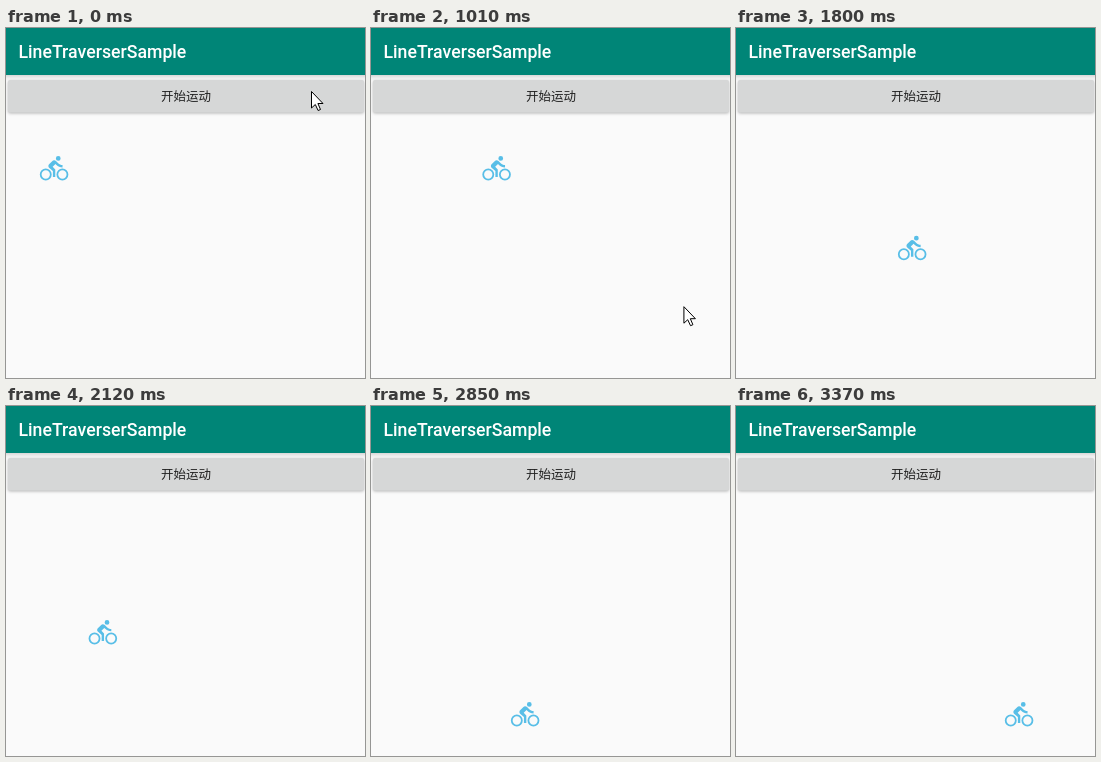
These frames come from a looping animation (359 px wide and 350 px high, 3.73 s). An HTML page with a canvas:

```html
<!DOCTYPE html>
<html lang="zh">
<head>
<meta charset="utf-8">
<style>
  html, body { margin: 0; width: 100%; height: 100%; overflow: hidden; background: #fafafa; }
  canvas { display: block; }
</style>
</head>
<body>
<canvas id="stage" width="359" height="350"></canvas>
<script>
const ctx = document.getElementById('stage').getContext('2d');
const LOOP = 3730;

// The screen refreshes in steps: [start time, equal steps until the next start].
const STEPS = [[650, 10], [1160, 1], [1220, 3], [1360, 1], [1420, 6], [1740, 2], [1860, 9],
  [2290, 1], [2350, 2], [2440, 1], [2500, 7], [2850, 1], [2900, 9], [3370, 1]];

const clamp = v => Math.min(1, Math.max(0, v));
const progress = (t, from, to) => clamp((t - from) / (to - from));
const ease = u => u * u * (3 - 2 * u);

function circle(path, x, y, r) {
  path.moveTo(x + r, y);
  path.arc(x, y, r, 0, Math.PI * 2);
}

const rider = new Path2D('M10.8 10.5l2.4-2.4.8.8c1.3 1.3 3 2.1 5.1 2.1V9c-1.5 0-2.7-.6-3.6-1.5' +
  'l-1.9-1.9c-.5-.4-1-.6-1.6-.6s-1.1.2-1.4.6L7.8 8.4c-.4.4-.6.9-.6 1.4 0 .6.2 1.1.6 1.4' +
  'L11 14v5h2v-6.2z');
circle(rider, 15.5, 3.5, 2);
const wheels = new Path2D();
circle(wheels, 5, 17, 4.25);
circle(wheels, 19, 17, 4.25);
const arrow = new Path2D('M0 0V16.5L3.8 13 6.6 19 9 18 6.4 12H11.5Z');
const button = new Path2D();
button.roundRect(2, 52, 356, 32.5, 2);

function snap(t) {
  if (t < STEPS[0][0]) return 0;
  let i = STEPS.length - 1;
  while (t < STEPS[i][0]) i--;
  const [start, count] = STEPS[i];
  if (i === STEPS.length - 1) return start;
  const step = (STEPS[i + 1][0] - start) / count;
  return start + Math.floor((t - start) / step + 1e-6) * step;
}

// Line to the right, S-curve down to the left, line to the right.
function bikeOffset(t) {
  const w = 167.5, h = 168;
  if (t < 1513) return [w * progress(t, 591, 1490), 0];
  if (t < 2424) {
    const u = progress(t, 1513, 2424), v = 1 - u;
    const pull = 3 * v * v * u;
    return [w * (v ** 3 + pull), h * (pull + u ** 3)];
  }
  return [235 * progress(t, 2424, 3368), h];
}

function shadowed(color, blur, dy, draw) {
  ctx.save();
  ctx.shadowColor = color;
  ctx.shadowBlur = blur;
  ctx.shadowOffsetY = dy;
  draw();
  ctx.restore();
}

function drawBar() {
  ctx.fillStyle = '#008577';
  shadowed('rgba(0,0,0,.22)', 5, 1, () => ctx.fillRect(-5, -5, 369, 52));
  ctx.fillStyle = '#fff';
  ctx.textAlign = 'left';
  ctx.font = '500 17.7px Roboto, sans-serif';
  ctx.fillText('LineTraverserSample', 12.5, 30);
}

function drawButton(t) {
  ctx.fillStyle = '#d6d7d7';
  shadowed('rgba(0,0,0,.26)', 3, 1, () => ctx.fill(button));
  if (t >= 650 && t < 950) {
    const p = 0.19 + 0.3 * progress(t, 650, 900);
    const fade = 1 - progress(t, 700, 950);
    ctx.save();
    ctx.clip(button);
    ctx.fillStyle = `rgba(0,0,0,${0.05 * fade})`;
    ctx.fillRect(0, 50, 359, 40);
    ctx.beginPath();
    circle(ctx, 306 - 126 * p, 68.5, 173 * p);
    ctx.fill();
    ctx.restore();
  }
  ctx.fillStyle = '#212121';
  ctx.textAlign = 'center';
  ctx.font = '12.5px "Noto Sans CJK SC", "Noto Sans CJK", sans-serif';
  ctx.fillText('开始运动', 180, 73);
}

function drawBike(t) {
  const [x, y] = bikeOffset(t);
  ctx.save();
  ctx.translate(33.8 + x, 126.3 + y);
  ctx.scale(1.19, 1.19);
  ctx.fillStyle = ctx.strokeStyle = '#58bee7';
  ctx.lineWidth = 1.5;
  ctx.fill(rider);
  ctx.stroke(wheels);
  ctx.restore();
}

function drawCursor(t) {
  const u = ease(progress(t, 780, 1120));
  if (u === 1) return;
  ctx.save();
  ctx.translate(305.5 + 10 * u, 63.5 + 290 * u);
  ctx.fillStyle = '#fff';
  ctx.strokeStyle = '#000';
  ctx.lineWidth = 1;
  ctx.fill(arrow);
  ctx.stroke(arrow);
  ctx.restore();
}

function frame() {
  const t = snap(performance.now() % LOOP);
  ctx.fillStyle = '#fafafa';
  ctx.fillRect(0, 0, 359, 350);
  drawBar();
  drawButton(t);
  drawBike(t);
  drawCursor(t);
  requestAnimationFrame(frame);
}
frame();
</script>
</body>
</html>
```
